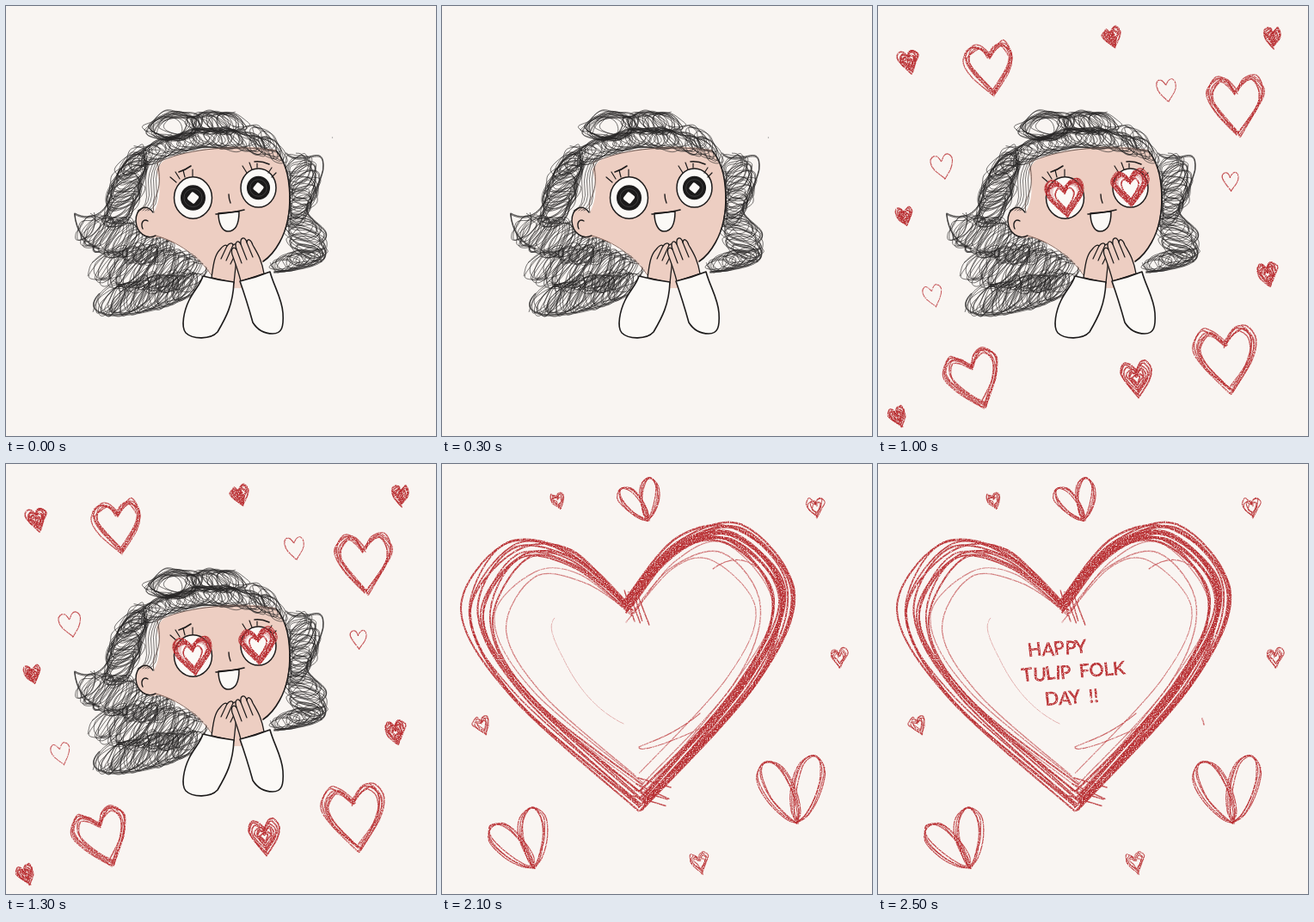
An HTML page for the animation above (3 s loop, 500 by 500 pixels).

```html
<!DOCTYPE html>
<html lang="en">
<head>
<meta charset="utf-8">
<title>Heart eyes</title>
<style>
  html, body { margin: 0; width: 100%; height: 100%; overflow: hidden; background: #f9f5f2; }
  svg { display: block; width: 100vw; height: 100vh; }
  path { fill: none; stroke-linecap: round; stroke-linejoin: round; }
  text { font: 21px Lato, "Open Sans", sans-serif; word-spacing: 5px; fill: #b93033; stroke: #b93033; stroke-width: .8; }
</style>
</head>
<body>
<svg id="stage" viewBox="0 0 500 500">
  <defs>
    <filter id="crayon" filterUnits="userSpaceOnUse" x="0" y="0" width="500" height="500" color-interpolation-filters="sRGB">
      <feTurbulence type="fractalNoise" baseFrequency=".7" numOctaves="2" seed="4"/>
      <feColorMatrix values="0 0 0 0 0  0 0 0 0 0  0 0 0 0 0  3 0 0 0 -.5" result="grain"/>
      <feComposite in="SourceGraphic" in2="grain" operator="in"/>
    </filter>
  </defs>
</svg>
<script>
const LOOP = 3000, RED = '#b93033', INK = '#1d1b1b', HAIR = '#272525', SKIN = '#edcec2', PAPER = '#fbf9f6';
const stage = document.getElementById('stage');

let seed = 7;
const rnd = () => (seed = seed * 16807 % 2147483647) / 2147483647;
const jit = n => (rnd() * 2 - 1) * n;
const mix = (a, b, k) => a + (b - a) * k;

// Point (u, v) turned by deg and moved to (x, y).
function place(x, y, u, v, deg) {
  const a = deg * Math.PI / 180, c = Math.cos(a), s = Math.sin(a);
  return [x + u * c - v * s, y + u * s + v * c];
}

function add(parent, tag, attrs, text) {
  const el = document.createElementNS('http://www.w3.org/2000/svg', tag);
  for (const k in attrs) el.setAttribute(k, attrs[k]);
  if (text) el.textContent = text;
  return parent.appendChild(el);
}

// Group that is visible only between two times of the loop.
function scene(from, to, parent = stage) {
  const g = add(parent, 'g', {});
  const frames = [];
  const step = (t, visibility) => frames.push({ visibility, offset: t / LOOP, easing: 'step-end' });
  if (from > 0) step(0, 'hidden');
  step(from, 'visible');
  if (to < LOOP) step(to, 'hidden');
  step(LOOP, to < LOOP ? 'hidden' : 'visible');
  g.animate(frames, { duration: LOOP, iterations: Infinity }).startTime = 0;
  return g;
}

const crayon = (from, to) => add(scene(from, to), 'g', { filter: 'url(#crayon)' });

const line = (g, d, width = 1.5, color = INK, fill = 'none', opacity = 1) =>
  add(g, 'path', { d, stroke: color, 'stroke-width': width, style: `fill:${fill}`, opacity });

// Catmull-Rom curve through the points.
function curve(p) {
  let d = `M${p[0].map(v => v.toFixed(1))}`;
  for (let i = 0; i < p.length - 1; i++) {
    const a = p[i - 1] || p[i], b = p[i], c = p[i + 1], e = p[i + 2] || c;
    const q = [0, 1].map(k => b[k] + (c[k] - a[k]) / 6);
    const r = [0, 1].map(k => c[k] - (e[k] - b[k]) / 6);
    d += 'C' + [...q, ...r, ...c].map(v => v.toFixed(1));
  }
  return d;
}

// Pen loops from one point to another; the way bulges sideways and the tilt turns from deg to end.
function scribble(g, [x0, y0], [x1, y1], rx, ry, loops, { deg = -48, end = deg, bulge = 0, passes = 2 } = {}) {
  const len = Math.hypot(x1 - x0, y1 - y0);
  for (let n = 0; n < passes; n++) {
    const pts = [], total = loops * 7, shift = rnd() * 6;
    for (let i = 0; i <= total; i++) {
      const u = i / total, th = i / 7 * Math.PI * 2 + shift;
      const arch = Math.sin(u * Math.PI), out = bulge * arch / len, size = .6 + .3 * arch;
      pts.push(place(
        mix(x0, x1, u) + (y1 - y0) * out, mix(y0, y1, u) - (x1 - x0) * out,
        Math.cos(th) * rx * (size + jit(.2)), Math.sin(th) * ry * (size + jit(.25)),
        mix(deg, end, u) + jit(9)));
    }
    line(g, curve(pts), .8, HAIR, 'none', .8);
  }
}

// Heart of two halves from notch to tip; later passes shrink.
const HALF = [[0, -.24], [.17, -.44], [.36, -.47], [.5, -.24], [.37, .08], [0, .5]];
function heart(g, x, y, size, deg, { tall = 1.15, passes = 1, width = 1.5, loose = .6, shrink = 0, opacity = .9, sides = [-1, 1] } = {}) {
  for (let n = 0; n < passes; n++) {
    const w = size * (1 - shrink * n / passes);
    for (const side of sides) {
      const pts = HALF.map(([u, v]) => place(x + jit(loose), y + jit(loose), u * side * w, v * w * tall, deg));
      line(g, curve(pts), width * (.85 + rnd() * .3), RED, 'none', opacity);
    }
  }
}

// Two leaf-shaped lobes that share a tip.
function petals(g, x, y, len, deg) {
  for (const lean of [-22, 22])
    for (let n = 0; n < 4; n++) {
      const pts = [], wide = len * (.15 + .025 * n);
      for (let i = 0; i <= 8; i++) {
        const th = i / 8 * Math.PI * 2;
        const across = Math.sin(th) * (1 - .35 * Math.cos(th)) * wide;
        pts.push(place(x + jit(1.3), y + jit(1.3), across, (Math.cos(th) - 1) / 2 * len, deg + lean));
      }
      line(g, curve(pts), 1.3, RED, 'none', .85);
    }
}

const oval = (g, cx, cy, rx, ry, fill, stroke = 'none') =>
  add(g, 'ellipse', { cx, cy, rx, ry, fill, stroke, 'stroke-width': 1.5 });

/* Girl */
const girl = scene(0, 1500);
scribble(girl, [90, 257], [185, 288], 27, 14, 19);
scribble(girl, [113, 299], [222, 313], 34, 15, 21);
scribble(girl, [114, 343], [216, 325], 30, 13, 19);
scribble(girl, [337, 181], [336, 245], 22, 15, 15, { bulge: 10 });
scribble(girl, [342, 248], [354, 288], 25, 13, 9, { deg: 20 });
scribble(girl, [360, 289], [318, 302], 20, 10, 8, { deg: -10 });
scribble(girl, [149, 177], [131, 246], 30, 15, 17);
for (let i = 0; i < 3; i++) {
  const wisps = add(girl, 'g', { transform: `translate(${jit(1.5)} ${jit(1.5)})` });
  line(wisps, 'M124 208C122 240 100 252 80 241C82 262 92 275 109 282M109 334C98 345 98 357 124 359C160 359 200 346 228 329', .8, HAIR, 'none', .8);
  line(wisps, 'M326 171C345 190 372 155 369 190C362 220 345 225 352 242C362 256 384 262 366 276C384 296 360 304 312 309', .8, HAIR, 'none', .8);
}

// Head
line(girl, 'M182 181C202 168 262 158 313 167C334 190 334 246 318 275C310 289 301 297 294 301L274 328H262L240 313C225 290 203 276 178 268C160 275 146 257 153 240C158 230 168 232 171 242C181 225 180 205 175 190Z', .1, SKIN, SKIN);
line(girl, 'M314 168C334 191 335 245 318 275C312 286 305 293 299 297', 1.6);
line(girl, 'M171 240C163 229 151 235 151 250C152 264 163 272 174 267M165 250C160 247 156 252 159 259', 1.4);
line(girl, 'M174 267C200 274 224 291 239 313', 1, '#8d6a5f');

// Fringe and curls
scribble(girl, [142, 187], [317, 169], 27, 12, 25, { deg: -45, end: 45, bulge: 24 });
scribble(girl, [186, 141], [203, 138], 32, 17, 8, { deg: -8 });
scribble(girl, [222, 137], [268, 134], 23, 13, 10, { deg: 20 });
scribble(girl, [286, 146], [310, 161], 20, 10, 6, { deg: 45, passes: 1 });
for (let i = 0; i < 5; i++)
  line(girl, `M${184 - i * 3} 176Q${172 - i * 3} ${192 + jit(3)} ${175 - i * 3} 212T${165 - i * 3} 238`, .8, HAIR, 'none', .75);
line(girl, 'M172 240C170 231 172 227 176 217C180 206 178 190 176 182C205 168 255 160 314 168', .9, '#5d4a45');

// Face
const EYES = [{ x: 217.5, y: 223, r: 22 }, { x: 293.5, y: 211.5, r: 20.5 }];
for (const { x, y, r } of EYES) oval(girl, x, y, r, r * 1.1, PAPER, INK);
line(girl, 'M191 199L198 205M197 193L202 201M206 191L208 199M217 190V198M275 186L280 194M283 182L286 190M292 183V188M309 188L305 194M314 194L309 199', 1.2);
line(girl, 'M201 193Q208 191 215 186M289 181Q297 180 306 184', 1.6);
line(girl, 'M259 219Q259 224 261 229', 1.4);
line(girl, 'M247 241C247 252 251 262 258 262C266 262 271 256 271 239Z', 1.5, INK, PAPER);
line(girl, 'M244 242C254 241 266 240 277 237', 1.6);

// Hands and sleeves
line(girl, 'M239 316C241 302 242 290 249 283C252 279 255 277 257 279C261 274 264 276 264 278C268 275 271 279 269 284L265 322Z', 1.3, INK, SKIN);
line(girl, 'M257 279L250 294M264 278L256 296M269 284L261 300', 1.2);
line(girl, 'M273 320C270 308 267 300 263 289C261 282 265 279 268 283C265 274 270 271 273 277C272 268 278 268 280 275C281 269 285 272 287 278C292 287 297 294 300 311Z', 1.3, INK, SKIN);
line(girl, 'M268 283L274 299M273 277L280 295M280 275L287 292', 1.2);
line(girl, 'M229 314Q247 319 265 321C264 347 256 362 246 379C238 388 217 388 209 380C203 373 207 354 213 342C219 330 226 324 229 314Z', 1.6, INK, PAPER);
line(girl, 'M272 320Q290 316 307 309C311 325 321 340 322 357C323 373 321 381 310 381C299 381 292 376 287 368C282 350 278 337 272 320Z', 1.6, INK, PAPER);

// Plain eyes
const calm = scene(0, 500, girl);
for (const { x, y, r } of EYES) {
  const s = r * .48;
  oval(calm, x, y, r * .66, r * .67, '#1b1a1a');
  add(calm, 'circle', { cx: x, cy: y, r: r * .48, fill: 'none', stroke: '#555', 'stroke-width': .6 });
  add(calm, 'rect', { x: x - s / 2, y: y - s / 2, width: s, height: s, rx: 2, fill: PAPER, transform: `rotate(38 ${x} ${y})` });
}
oval(calm, 379.5, 153, .7, .7, '#999');

/* First hearts */
const MINI = [[75, 187, 25, -10], [336, 98, 23, -8], [410, 204, 19, -4], [64, 337, 22, -16]];
const love = crayon(500, 1000);
for (const m of MINI) heart(love, ...m, { width: 1.7 });
for (const { x, y, r } of EYES) {
  heart(love, x, y, r * 1.32, -6, { tall: .93, passes: 2, width: 2.2 });
  heart(love, x, y + .5, r * .85, -6, { tall: .9, passes: 8, width: 2.4, shrink: .95, loose: .4 });
}

/* Heart shower */
const shower = crayon(1000, 1500);
for (const m of MINI) heart(shower, ...m, { width: 1.2, opacity: .8 });
for (const { x, y, r } of EYES) {
  heart(shower, x, y, r * 1.8, -6, { tall: .95, passes: 5, width: 3, loose: 1, shrink: .25, opacity: .25 });
  heart(shower, x, y, r * 2.1, -6, { tall: .95, passes: 6, loose: 1.5, shrink: .3 });
  heart(shower, x, y + 1, r, -6, { passes: 2, width: 1.3 });
}
for (const h of [[131, 73, 56, -8], [417, 116, 66, -3], [113, 435, 64, -19], [406, 411, 72, -8]])
  heart(shower, ...h, { tall: 1.08, passes: 6, loose: 2.4, shrink: .2, opacity: .8 });
for (const h of [[36, 65, 23, -15], [272, 37, 20, -14], [459, 37, 20, 0], [31, 245, 19, -8], [453, 312, 24, -10], [301, 434, 36, -8], [23, 478, 20, -22]])
  heart(shower, ...h, { passes: 7, width: 1.7, loose: 1.3, shrink: .9 });

/* Big heart */
const big = crayon(1500, LOOP);
const BIG = [222, 238, 384, -4];
heart(big, ...BIG, { tall: .86, passes: 10, width: 1.9, loose: 5, shrink: .17, sides: [-1] });
heart(big, ...BIG, { tall: .86, passes: 14, width: 2.3, loose: 5, shrink: .13, sides: [1] });
heart(big, 222, 238, 330, -4, { tall: .86, passes: 3, width: 1.2, loose: 6, shrink: .2, opacity: .6 });
line(big, 'M131 179C122 188 130 205 142 228C160 265 184 289 211 302', .9, RED, 'none', .4);
line(big, 'M315 122Q342 102 366 120M300 290C270 315 245 322 229 329C228 336 260 327 312 302', 1.2, RED, 'none', .7);
for (let i = 0; i < 4; i++)
  line(big, `M${212 + i * 5} ${150 + jit(4)}l${12 + jit(3)} 36M${222 + i * 2} ${386 - i * 7}l38 ${10 + jit(9)}`, 1.5, RED, 'none', .85);

petals(big, 240, 65, 48, -20);
petals(big, 413, 417, 80, -7);
petals(big, 107, 469, 69, -24);
for (const h of [[135, 43, 17, -14], [435, 51, 20, -6], [462, 226, 19, -4], [47, 304, 19, -18], [300, 464, 21, -16]])
  heart(big, ...h, { passes: 4, width: 1.2, loose: 1.5, shrink: .7, opacity: .85 });

/* Greeting */
const note = crayon(2500, LOOP);
[['HAPPY', 175, 224], ['TULIP FOLK', 168, 253], ['DAY !!', 195, 281]].forEach(([words, x, y]) =>
  add(note, 'text', { x, y, rotate: '-3 3 -4 4 -2', transform: `rotate(-4 ${x} ${y})` }, words));
line(note, 'M377 296L379 303', 1.6, RED, 'none', .7);
</script>
</body>
</html>
```
